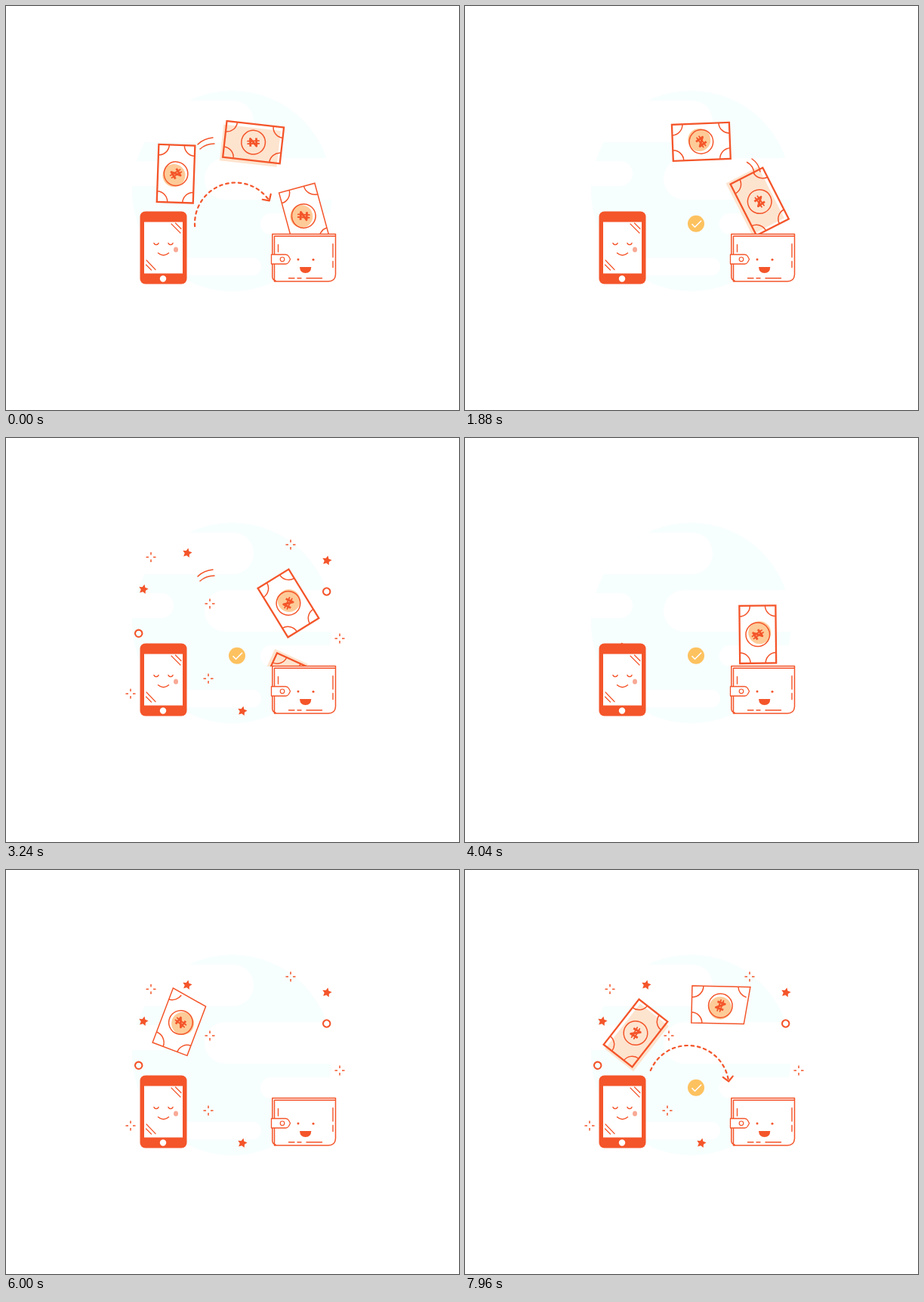
These frames come from a looping animation (600x534 px, 8 s). An HTML page:

```html
<!DOCTYPE html>
<html lang="en">
<head>
<meta charset="utf-8">
<title>Mobile money</title>
<style>
  html, body { margin: 0; width: 100%; height: 100%; overflow: hidden; background: #fff; }
  svg { display: block; width: 100%; height: 100%; }
  .line { fill: none; stroke: #f4552a; stroke-width: 1.5; stroke-linecap: round; stroke-linejoin: round; }
  .butt { stroke-linecap: butt; }
  .miter { stroke-linejoin: miter; }
  .solid { fill: #f4552a; }
  .white { fill: #fff; }
</style>
</head>
<body>
<svg viewBox="0 0 600 534">
  <defs>
    <clipPath id="slots"><path d="M0 0H600V302H300V274H0Z"/></clipPath>
    <clipPath id="disc"><circle cx="299.500" cy="244.500" r="132.500"/></clipPath>
    <g id="naira">
      <path class="line butt" style="stroke-width:2.8" d="M-4 5.500V-5L4 5V-5.500"/>
      <path class="line" style="stroke-width:1.8" d="M-7.500 -1.800H7.500M-7.500 1.800H7.500"/>
    </g>
  </defs>

  <g clip-path="url(#disc)">
    <rect x="160" y="110" width="280" height="270" fill="#f7fefe"/>
    <g class="white">
      <rect x="100" y="125" width="228" height="55" rx="27.500"/>
      <rect x="100" y="205" width="122" height="33" rx="16.500"/>
      <rect x="263" y="201" width="240" height="55" rx="27.500"/>
      <rect x="337" y="274" width="160" height="28" rx="14"/>
      <rect x="190" y="333" width="148" height="23" rx="11.500"/>
    </g>
  </g>

  <g id="decor"></g>
  <g id="arrow" class="line" style="stroke-width:2.2">
    <path d="M-46.300 -27.800A54 54 0 0 1 54 0" stroke-dasharray="3.600 4.800"/>
    <path d="M47.500 -5.500L54 1L60.500 -5"/>
  </g>
  <g id="check">
    <circle r="11" fill="#fdc25f"/>
    <path d="M-5.500 .5L-1.500 4.500L7 -4" fill="none" stroke="#fff" stroke-width="1.600"/>
  </g>
  <g id="bills" clip-path="url(#slots)"></g>
  <path id="leftTrail" class="line" d="M254 183Q262 175 274 174M257 189Q265 182 276 182"/>
  <path id="rightTrail" class="line" d="M373.500 206.500Q382 211 383 221M380 202Q389 208 391 219"/>

  <g id="phone">
    <rect class="solid" x="177.500" y="271.500" width="62" height="96" rx="7"/>
    <rect class="white" x="183" y="285.500" width="51" height="68"/>
    <circle class="white" cx="208" cy="360.500" r="4.200"/>
    <ellipse cx="225" cy="322" rx="3" ry="3.600" fill="#f8a995"/>
    <path class="line" d="M196 313.500A3.200 3.200 0 0 0 202 313.500M215 313.500A3.200 3.200 0 0 0 221 313.500M201.500 326.500Q208.500 332.500 215.500 326.500"/>
    <path class="line" style="stroke-width:1.2" d="M219 288L231 300M224.500 287L232 294.500M186 336L198 348.500M185.500 342L192.500 349"/>
  </g>

  <g id="wallet">
    <path class="white" d="M353 302H436.500V356Q436 364 428 364H360Q353 364 353 357Z"/>
    <path class="line" d="M436.500 304V301.500H352.800V358Q353 362 357 363M355.500 304.200H436.500V355Q436 364 427 364H355.500Z"/>
    <path class="line" style="fill:#fff;stroke-width:1.3" d="M351.500 328.500H370.500Q373 328.500 374.500 331L376.500 334.800L374.500 338.500Q373 341 370.500 341H351.500Z"/>
    <circle class="line" style="stroke-width:1.2" cx="366" cy="334.800" r="2.800"/>
    <path class="line" style="stroke-width:1.4" d="M360.500 315.500V325M433 314.500V332M433 337.500V345.500M374.500 359.800H382M386 359.800H391M398 359.800H418.500"/>
    <circle class="solid" cx="387" cy="335" r="1.500"/>
    <circle class="solid" cx="407" cy="335.300" r="1.500"/>
    <path class="solid" d="M389 345H404.300Q404 353 396.700 353Q389.500 353 389 345Z"/>
  </g>
</svg>

<script>
const LOOP = 8, ORBIT = 10; // seconds
const TAU = 2 * Math.PI;
const $ = id => document.getElementById(id);
const clamp = v => Math.min(1, Math.max(0, v));
const easeOut = v => 1 - (1 - clamp(v)) ** 3;
const show = (el, on) => { el.style.display = on ? '' : 'none'; };
const between = (t, a, b) => t >= a && t < b;
const place = (el, x, y, angle) =>
  el.setAttribute('transform', `translate(${x} ${y}) rotate(${angle})`);

const RECT = 'M-38 -24H38V24H-38Z';
const SKEWED = 'M-38 -25.500L39 -25.500L31.500 23.500H-38Z';
const ALL_ARCS = 'M-24 -24A14 14 0 0 1 -38 -10M-38 10A14 14 0 0 1 -24 24' +
  'M24 -24A14 14 0 0 0 38 -10M38 10A14 14 0 0 0 24 24';
const THREE_ARCS = 'M-23 -25.500A15 15 0 0 1 -38 -10.500M-38 9.500A14 14 0 0 1 -24 23.500' +
  'M23 -25.500A15 15 0 0 0 34 -12';
const coinFill = (x, y) => `<circle cx="${x}" cy="${y}" r="15" fill="#fdcb98"/>`;

// phase: place on the orbit at time 0; tilt: turn relative to the orbit; sway swings it, most at peak.
const bills = [
  { radius: 90, phase: -72.5, tilt: 81.5, sway: 14, peak: 7.2,
    outline: RECT, arcs: ALL_ARCS, width: 2.3, symbolTurn: -8, coin: '',
    tint: '<rect x="-41.700" y="-19.200" width="76" height="48" fill="#fde4cf"/>' },
  { radius: 87.5, phase: -149.6, tilt: 76, sway: 17.5, peak: 4.05,
    outline: RECT, arcs: ALL_ARCS, width: 2.3, symbolTurn: 57, coin: coinFill(-2.5, -2.5), tint: '' },
  { radius: 94.5, phase: 7, tilt: 67.7, sway: 0, peak: 0,
    outline: SKEWED, arcs: THREE_ARCS, width: 1.5, symbolTurn: 108, coin: coinFill(-.3, 3), tint: '' }
];
$('bills').innerHTML = bills.map(b => `<g><path class="white" d="${b.outline}"/>${b.tint}
  <path class="line miter" style="stroke-width:${b.width}" d="${b.outline}"/>
  <path class="line butt" d="${b.arcs}"/>${b.coin}
  <circle class="line" r="15.800"/><use href="#naira" transform="rotate(${b.symbolTurn})"/></g>`).join('');

function drawBill(b, i, t) {
  const polar = b.phase + 360 * t / ORBIT, a = polar * TAU / 360;
  const angle = polar + b.tilt + b.sway * Math.cos(TAU * (t - b.peak) / ORBIT);
  place($('bills').children[i], 300.5 + b.radius * Math.cos(a), 266 + b.radius * Math.sin(a), angle);
}

const starPath = 'M' + Array.from({ length: 10 }, (_, i) => {
  const r = i % 2 ? 3.3 : 6.6, a = (i * 36 - 78) * TAU / 360;
  return `${(r * Math.cos(a)).toFixed(2)} ${(r * Math.sin(a)).toFixed(2)}`;
}).join('L') + 'Z';
const shapes = {
  sparkle: '<path class="line butt" d="M0 -6.500V-3M0 3V6.500M-6.500 0H-3M3 0H6.500"/>',
  star: `<path class="solid" d="${starPath}"/>`,
  ring: '<circle class="line" style="stroke-width:2.1" r="4.700"/>'
};
const spots = {
  sparkle: [[192, 157.5], [377, 141], [270, 219], [442, 265], [268, 318], [165, 338]],
  star: [[240, 152], [425, 162], [182, 200], [313, 361]],
  ring: [[424.7, 203], [175.7, 258.3]]
};
$('decor').innerHTML = Object.entries(spots).flatMap(([kind, list]) =>
  list.map(([x, y]) => `<g transform="translate(${x} ${y})"><g class="pop">${shapes[kind]}</g></g>`)).join('');
const pops = [...document.querySelectorAll('.pop')];

// Grows in after each start and shrinks away before each end.
const popScale = (t, windows) => Math.max(...windows.map(([a, b]) =>
  Math.min(easeOut((t - a) / .33), clamp((b - t) / .33))));

function draw(t) {
  bills.forEach((b, i) => drawBill(b, i, t));

  const swinging = t < 1.35;
  show($('arrow'), swinging || t > 6.4);
  if (swinging) place($('arrow'), 304, 287.5, -35 + 15 * t);
  else place($('arrow'), 295.5, 286, -8 - 20 * (1 - easeOut((t - 6.4) / .6)));

  const decorScale = popScale(t, [[.25, 1.4], [2.2, 3.9], [5.3, 9]]);
  show($('decor'), decorScale > 0);
  pops.forEach(p => p.setAttribute('transform', `scale(${decorScale})`));

  const checkScale = popScale(t, [[.25, 5.05], [7.55, 9]]);
  show($('check'), checkScale > 0);
  $('check').setAttribute('transform', `translate(306 287.700) scale(${checkScale})`);

  show($('leftTrail'), t < .45 || between(t, 2.7, 3.7));
  show($('rightTrail'), between(t, .45, 2.3));
}

const start = performance.now();
function frame() {
  draw((performance.now() - start) / 1000 % LOOP);
  requestAnimationFrame(frame);
}
frame();
</script>
</body>
</html>
```
